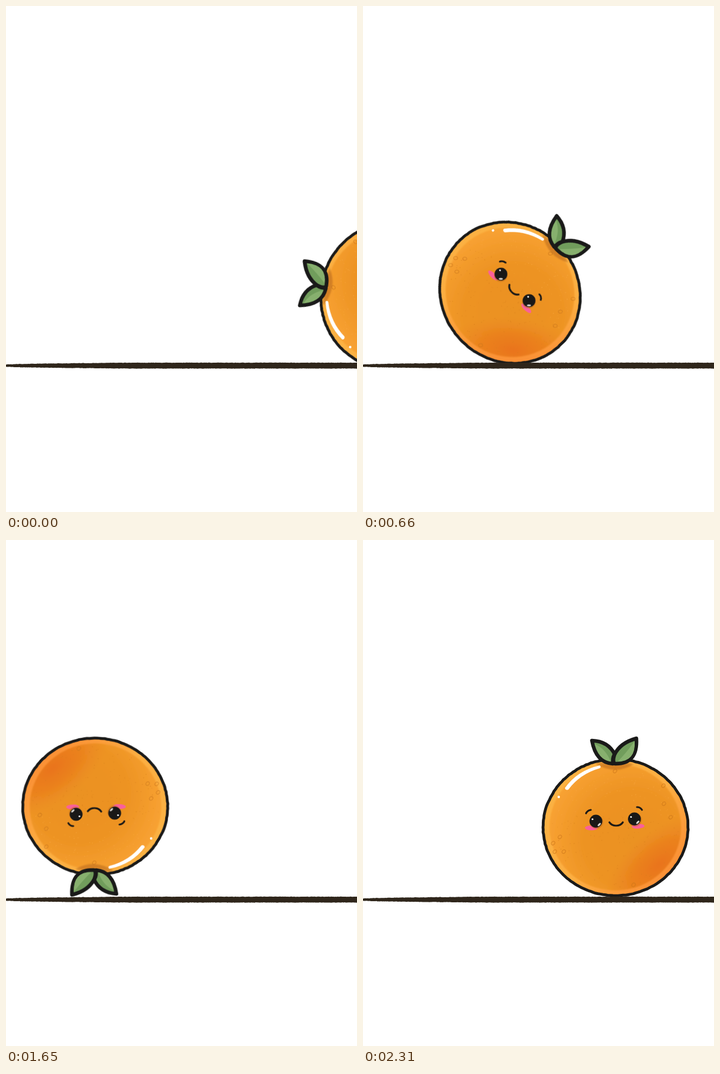
An HTML page for the animation above (2640 ms loop, 624 by 898 pixels).

```html
<!DOCTYPE html>
<html lang="en">
<head>
<meta charset="utf-8">
<title>Rolling orange</title>
<style>
  html, body { margin: 0; width: 100%; height: 100%; overflow: hidden; background: #fff; }
  svg { display: block; width: 100vw; height: 100vh; }
</style>
</head>
<body>
<svg viewBox="0 0 624 898" preserveAspectRatio="none" fill="none" stroke-linecap="round" stroke-linejoin="round">
  <defs>
    <linearGradient id="rim" gradientUnits="userSpaceOnUse" x1="-90" y1="-90" x2="90" y2="90">
      <stop offset="0" stop-color="#fbb243"/>
      <stop offset=".55" stop-color="#fcae42"/>
      <stop offset="1" stop-color="#fb8f35"/>
    </linearGradient>
    <radialGradient id="flesh" gradientUnits="userSpaceOnUse" cx="30" cy="22" r="158">
      <stop offset="0" stop-color="#eb9222"/>
      <stop offset=".55" stop-color="#ed9323"/>
      <stop offset="1" stop-color="#f9a334"/>
    </radialGradient>
    <radialGradient id="shade" gradientUnits="userSpaceOnUse" cx="0" cy="0" r="1"
      gradientTransform="translate(78 66) rotate(-40) scale(118 60)">
      <stop offset="0" stop-color="#e8691a" stop-opacity=".75"/>
      <stop offset=".5" stop-color="#e9701a" stop-opacity=".48"/>
      <stop offset="1" stop-color="#ea821d" stop-opacity="0"/>
    </radialGradient>
    <filter id="soft"><feGaussianBlur stdDeviation="1.3"/></filter>
    <clipPath id="inside"><ellipse cx="-.5" cy="-.5" rx="117" ry="112.500"/></clipPath>
  </defs>

  <g id="orange">
    <path id="skin" fill="url(#rim)"/>
    <g filter="url(#soft)">
      <ellipse cx="-.5" cy="-.5" rx="117" ry="112.500" fill="url(#flesh)"/>
      <ellipse cx="-.5" cy="-.5" rx="117" ry="112.500" fill="url(#shade)"/>
    </g>
    <g id="speckles" clip-path="url(#inside)"/>
    <g id="pores" stroke="#c9741a" stroke-width="1.2" opacity=".6"/>
    <path d="M-36-113Q0-92 32-112Q0-121-36-113Z" fill="#b8691a" opacity=".55" filter="url(#soft)"/>
    <path id="outline" stroke="#1a1a19" stroke-width="5"/>

    <path d="M-90-70Q-68-101-28-110Q-25-107-28-105Q-63-95-84-67Q-89-65-90-70Z" fill="#fff"/>
    <circle cx="-101" cy="-54" r="2.2" fill="#fff"/>

    <g stroke="#1a1a19" stroke-width="6.500">
      <path d="M-42-154Q-13-153-1-129Q3-121-5-113Q-35-115-42-154Z" fill="#719d5c"/>
      <path d="M37-158Q40-112-1-113Q-6-116-2-129Q8-150 37-158Z" fill="#719d5c"/>
    </g>
    <path d="M-37-148Q-17-139-9-117Q-30-120-37-148Z" fill="#87b06e"/>
    <path d="M34-153Q36-117 4-117Q18-131 34-153Z" fill="#87b06e"/>
    <path d="M-2-130Q-7-121-4-113" stroke="#1a1a19" stroke-width="6"/>

    <g fill="#f9609b">
      <ellipse cx="-43" cy="1" rx="11.500" ry="4.200"/>
      <ellipse cx="40" cy="-2" rx="11.500" ry="4.200" transform="rotate(-3 40 -2)"/>
    </g>
    <g id="eyes"/>
    <g stroke="#1d1a17" stroke-width="3.200">
      <path d="M-11-9Q-7-3 1-3Q9-3 13-9"/>
      <path d="M-52.500-25Q-50-30-44-31"/>
      <path d="M38-36Q44-36 47-31"/>
    </g>
  </g>
  <path id="ground" fill="#2f261b"/>
</svg>

<script>
const STEP = 330;
const byId = id => document.getElementById(id);

// Each pose: centre x, centre y, turn in degrees
const OFF_RIGHT = [681, 514, -81];
const UPRIGHT = [449, 510, 0];
const TILTED = [261.3, 508.8, 46.6];
const HEADSTAND = [158.6, 472.8, 181.6];
const OFF_LEFT = [-45, 510, 275];
const POSES = [OFF_RIGHT, UPRIGHT, TILTED, HEADSTAND, OFF_LEFT, HEADSTAND, TILTED, UPRIGHT];

let seed = 7;
function random() {
  seed = (seed * 16807) % 2147483647;
  return seed / 2147483647;
}
const jitter = size => (random() - 0.5) * size;

function add(parent, name, attributes) {
  const node = document.createElementNS("http://www.w3.org/2000/svg", name);
  for (const key in attributes) node.setAttribute(key, attributes[key]);
  parent.appendChild(node);
}

const toPath = points => "M" + points.map(p => p.map(v => v.toFixed(1)).join(" ")).join("L") + "Z";

function drawSkin() {
  const points = [];
  for (let deg = 0; deg < 360; deg += 2) {
    const a = deg * Math.PI / 180;
    const wobble = jitter(0.7);
    points.push([(128.9 + wobble) * Math.cos(a), (121.2 + wobble) * Math.sin(a)]);
  }
  byId("skin").setAttribute("d", toPath(points));
  byId("outline").setAttribute("d", toPath(points));
}

function drawSpeckles() {
  for (let i = 0; i < 260; i++) {
    const a = random() * Math.PI * 2;
    const r = Math.sqrt(random());
    const y = 108 * r * Math.sin(a);
    add(byId("speckles"), "circle", {
      cx: (114 * r * Math.cos(a)).toFixed(1),
      cy: y.toFixed(1),
      r: (0.5 + random() * 0.7).toFixed(1),
      fill: y < -20 ? "#f9ad4b" : "#cf7a1c",
      opacity: 0.3
    });
  }
}

function drawPores() {
  const spots = [[85, -74], [86, -42], [-99, 17], [-92, 43], [-111, 28], [-108, 43], [-1, -100], [32, 102], [98, -18]];
  for (const [x, y] of spots) {
    add(byId("pores"), "ellipse", { cx: x, cy: y, rx: 3.6, ry: 2.8, transform: `rotate(-50 ${x} ${y})` });
  }
}

function drawEye(x, y) {
  const eyes = byId("eyes");
  add(eyes, "circle", { cx: x + 1, cy: y + 1.5, r: 12, fill: "#b5651a", opacity: 0.5 });
  add(eyes, "circle", { cx: x, cy: y, r: 11.4, fill: "#191817" });
  add(eyes, "circle", { cx: x - 6, cy: y - 3.5, r: 1.6, fill: "#fff" });
  add(eyes, "ellipse", {
    cx: x + 6, cy: y + 6, rx: 3.6, ry: 1.6, fill: "#d8d4cf",
    transform: `rotate(-45 ${x + 6} ${y + 6})`
  });
}

function drawGround() {
  const top = [], bottom = [];
  for (let x = 0; x <= 626; x += 2) {
    const half = 2 + 3.2 * Math.min(1, x / 220) ** 0.6;
    top.push([x, 638.2 - half + jitter(0.6)]);
    bottom.unshift([x, 638.2 + half + jitter(0.6)]);
  }
  byId("ground").setAttribute("d", toPath(top.concat(bottom)));
}

function render(time) {
  const [x, y, turn] = POSES[Math.floor(time / STEP) % POSES.length];
  byId("orange").setAttribute("transform", `translate(${x} ${y}) rotate(${turn})`);
}

drawSkin();
drawSpeckles();
drawPores();
drawEye(-35, -11);
drawEye(33.5, -15);
drawGround();

const start = performance.now();
function tick() {
  render(performance.now() - start);
  requestAnimationFrame(tick);
}
tick();
</script>
</body>
</html>
```
